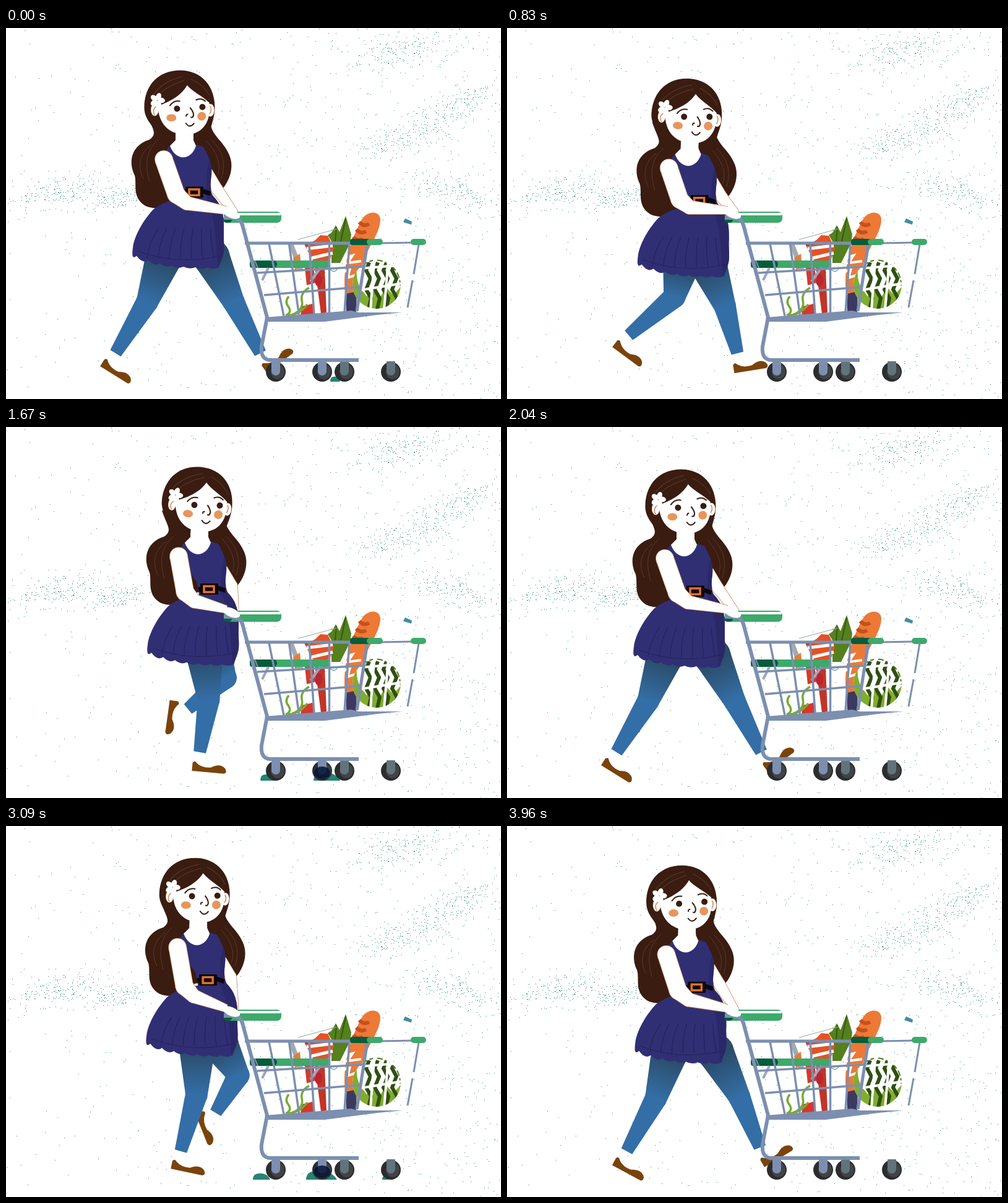
Recreate the animation shown at these times as an HTML page with a canvas. Size 800 by 600 pixels, loop 4000 ms.

```html
<!DOCTYPE html>
<html>
<head>
<meta charset="utf-8">
<style>
html, body { margin: 0; width: 100%; height: 100%; overflow: hidden; background: #fff; }
canvas { display: block; }
</style>
</head>
<body>
<canvas id="stage" width="800" height="600"></canvas>
<script>
const ctx = document.getElementById('stage').getContext('2d');
const { PI, sin, cos, abs, min, max, hypot } = Math;
const STEEL = '#7c8fb0', GREEN = '#3da96b', DEEP = '#075c3b', TEAL = '#258474';
const HAIR = '#3a1c11', SHEEN = '#5b3a2b', SKIN = '#fff', EDGE = '#c98a5a';
const NAVY = '#302f74', BLACK = '#0c080a', SHOE = '#7a430c';
const HALF = 16; // frames per step, two steps per walk cycle

function fill(d, color) {
  ctx.fillStyle = color;
  ctx.fill(new Path2D(d));
}
function line(d, color, width = 1.5) {
  ctx.strokeStyle = color;
  ctx.lineWidth = width;
  ctx.stroke(new Path2D(d));
}
function oval(x, y, rx, ry, color, turn = 0) {
  ctx.fillStyle = color;
  ctx.beginPath();
  ctx.ellipse(x, y, rx, ry, turn, 0, 7);
  ctx.fill();
}
function bar(x, y, w, h, r, color) {
  ctx.fillStyle = color;
  ctx.beginPath();
  ctx.roundRect(x, y, w, h, r);
  ctx.fill();
}
function placed(x, y, deg, draw) {
  ctx.save();
  ctx.translate(x, y);
  ctx.rotate(deg * PI / 180);
  draw();
  ctx.restore();
}
function repeat(n, part) {
  return Array.from({ length: n }, (_, i) => part(i)).join('');
}
// Tapered segments through points [x, y, radius]; the last end stays flat
function limb(points, color) {
  for (let i = 0; i < points.length - 1; i++) {
    const [x, y, r] = points[i], [X, Y, R] = points[i + 1];
    const len = hypot(X - x, Y - y), nx = (y - Y) / len, ny = (X - x) / len;
    oval(x, y, r, r, color);
    fill(`M${x + nx * r} ${y + ny * r}L${X + nx * R} ${Y + ny * R}L${X - nx * R} ${Y - ny * R}L${x - nx * r} ${y - ny * r}Z`, color);
  }
}
function skinLimb(points) {
  limb(points.map(([x, y, r]) => [x, y, r + .8]), EDGE);
  limb(points, SKIN);
}

// Fixed flecks of paint: an even dusting, denser to the right, plus a few clouds
let seed = 7;
const rnd = () => (seed = seed * 16807 % 2147483647) / 2147483647;
const bell = () => rnd() + rnd() + rnd() - 1.5;
const flecks = new Path2D();
const fleck = (x, y) => flecks.rect(Math.round(x), Math.round(y), 1, 1);
for (let i = 0; i < 900; i++) fleck(800 * rnd() ** .6, 600 * rnd());
function cloud(x, y, size, slope) {
  for (let i = 0; i < size * 2.2; i++) {
    const u = bell() * size;
    fleck(x + u, y + bell() * size / 3 + u * slope);
  }
}
cloud(640, 36, 90, -.15);
cloud(730, 125, 70, -.3);
cloud(640, 178, 85, -.25);
cloud(725, 265, 80, .35);
cloud(90, 265, 95, -.1);
cloud(180, 275, 50, -.15);

// Sway and bob of the upper body, one bounce per step
function bodyAt(f) {
  const lean = sin(PI * f / HALF);
  return {
    dx: 18 * abs(lean) + 6 * lean,
    dy: -1.5 - 3.5 * lean + (15 + 4 * lean) * sin(PI * f / 8),
    tilt: 3 + 3.5 * sin(PI * (f - 2) / 8)
  };
}

// p counts frames since the foot landed: first the foot carries, then it swings forward
function stride(p, dx) {
  const u = p % HALF / HALF, arc = sin(PI * u);
  return p < HALF
    ? { x: 411 - 234 * u + .8 * dx, y: 526, bend: 18 - 22 * u + 8 * arc,
        turn: min(0, 144 * u - 36) + max(0, 53 * (u - .4)) }
    : { x: 294 - 117 * cos(PI * u), y: 526 - 70 * arc ** 1.5, bend: 22 * u - 4 + 45 * arc,
        turn: 32 - 68 * u + 100 * arc ** 3 };
}

function leg(p, { dx, dy }) {
  const { x, y, bend, turn } = stride(p % (2 * HALF), dx);
  const kneeX = (288 + dx + x) / 2 + bend, kneeY = (360 + dy + y) / 2;
  const hipX = .45 * (288 + dx) + .55 * kneeX, hipY = 372 + dy;
  const blue = ctx.createLinearGradient(hipX, hipY, kneeX, kneeY);
  blue.addColorStop(.1, '#2b4c69');
  blue.addColorStop(1, '#346ea6');
  limb([[hipX, hipY, 30], [kneeX, kneeY, 18], [x, y, 10]], blue);
  placed(x, y, turn, () =>
    fill('M-10 31L-10 18Q-7 13-3 18Q6 25 20 23Q34 14 43 22Q48 29 42 31Z', SHOE));
}

function hairBack() {
  fill('M228 140C236 165 246 172 232 182C205 190 196 215 208 240C212 255 203 275 225 289C245 298 262 290 275 275L330 262L346 266C362 250 370 225 360 205C350 182 330 175 330 150Z', HAIR);
  line('M235 190C215 205 212 225 222 245M246 182C226 200 224 222 232 250M332 182C350 200 356 220 348 245M325 185C342 205 348 222 342 240', SHEEN, 1);
}

function head() {
  fill('M223 130C223 95 245 70 281 70C315 70 337 95 337 130C337 150 328 162 330 180L303 180L303 160L274 160L274 180L242 180C246 163 223 155 223 130Z', HAIR);
  line('M288 86C270 92 252 100 244 114M285 80C265 84 246 96 238 110M298 84C312 90 322 98 328 110', SHEEN, 1);
  for (const x of [240, 330]) {
    oval(x, 134, 6.5, 10.5, EDGE);
    oval(x, 134, 6, 10, SKIN);
  }
  fill('M292 94C300 104 318 112 328 122C332 152 318 174 290 174C262 174 246 155 245 128C262 122 282 112 292 94Z', SKIN);
  line('M242 129Q235 134 240 143M329 127Q333 132 329 140', EDGE);
  for (let a = 0; a < 6; a += PI * .4) oval(244 + 6.5 * cos(a), 119 + 6.5 * sin(a), 6, 4.3, SKIN, a);
  oval(267, 147, 8, 6, '#e8955c');
  oval(316, 144, 7, 7, '#e8955c');
  oval(276, 132, 5, 5, HAIR);
  oval(317, 129, 5, 5, HAIR);
  line('M264 128Q270 118 281 120M306 118Q315 113 322 120M297 130Q306 141 301 146L298 146M291 145Q290 141 294 141M290 155Q297 165 304 155', HAIR, 2);
}

function dress() {
  const hem = repeat(8, i => `Q${202 + 19 * i} ${378 + 15 * (1 - (1 - i / 7) ** 3)} ${211 + 19 * i} ${370 + 19 * (1 - (1 - i / 7) ** 3)}`);
  fill(`M255 205L264 192L307 190L319 194C325 205 335 222 332 240C330 254 329 262 334 272C347 286 353 300 352 330C351 350 355 360 349 375L344 389L205 357C207 338 222 312 238 295C258 280 272 279 288 276L284 255L262 225Z`, NAVY);
  fill(`M205 357${hem}L349 372L300 340Z`, NAVY);
  fill('M329 215C336 235 327 255 333 272C347 286 353 300 352 330C351 350 355 360 349 375L342 389C340 350 338 300 322 272C326 250 322 235 329 215Z', '#2b2868');
  line('M213 362Q275 386 347 370' + repeat(7, i => `M${246 + 14 * i} 326Q${230 + 17 * i} 350 ${228 + 18 * i} 374`), '#25225d', 1.2);
  fill('M274 160L274 183L265 192C274 217 299 217 307 192L303 183L303 160Z', SKIN);
  fill('M286 264L320 262L331 266L330 273L318 269L288 272Z', BLACK);
  bar(290, 258, 29, 18, 1, BLACK);
  ctx.strokeStyle = '#e2712b';
  ctx.lineWidth = 3.5;
  ctx.strokeRect(296, 262.5, 16, 9.5);
}

function loaf() {
  fill('M548 430C544 390 553 350 575 310C583 296 603 294 605 309C605 330 588 350 580 372L572 392L564 430Z', '#ed7937');
  line(repeat(3, i => `M${571 - 5 * i} ${314 + 12 * i}q7 8 16 3`), '#c6501d', 6);
  line('M546 372L560 368L552 380L574 377M545 395L556 389L552 404L570 398', SKIN, 4);
  fill('M549 430L567 426L566 459L550 462Z', '#3c3960');
}

function packets() {
  fill('M483 352L500 343L508 335L520 336L530 356L523 376L496 376Z', '#e45126');
  line('M486 357L528 352M494 372L528 364', SKIN, 5);
  line('M483 351L522 347', '#8b2033', 2);
  fill('M482 379L497 384L500 412L486 416Z', '#d43a27');
  fill('M499 386L515 390L518 460L509 462Z', '#c13528');
  oval(505, 408, 6, 10, '#ba2531');
  fill('M478 450L496 446L497 463L476 465Z', '#d8362c');
  fill('M456 348L464 348L480 390L472 392Z', '#a5a9ae');
  fill('M464 372L475 365L477 386L467 392Z', '#e27e3d');
}

function melon() {
  ctx.save();
  ctx.beginPath();
  ctx.ellipse(599, 415, 39, 39, 0, 0, 7);
  ctx.clip();
  fill('M558 370H640V458H558Z', SKIN);
  fill('M556 458V390L568 384Q564 405 573 421L583 434L592 424L604 437L614 419L626 432L640 416V460Z', '#80ad2d');
  line(repeat(4, i => `M${587 + 14 * i} 379l-5 13 7 13-7 18 8 14-4 18`), '#2f4f13', 6);
  ctx.restore();
  ctx.setLineDash([9, 4]);
  line('M576 384Q600 365 626 388Q638 400 637 420', '#4d7920', 2);
  ctx.setLineDash([]);
  line('M597 352L589 456M620 352L611 456M572 424L640 413M572 389L642 383', SKIN, 4);
}

function groceries() {
  fill('M520 335L526 331L533 319L539 330L549 304L558 334L556 348L540 380L526 380L526 345Z', '#55801f');
  line('M549 308L541 345M534 322L532 345', '#36590f', 2);
  line('M472 342L535 325', '#98a39a', 1);
  loaf();
  packets();
  line('M452 465Q463 460 456 450Q450 443 457 434M464 463Q482 455 478 440Q476 428 490 420M455 464Q472 466 487 447', '#78a935', 3.5);
  line('M524 391Q532 397 536 389', TEAL, 1);
  melon();
}

function wheel(x, steel) {
  oval(x, 556, 16, 16, '#2b2c2e');
  oval(x + 3, 556, 11, 12, '#414345');
  bar(x - 7, 539, 14, 23, [1, 1, 7, 7], steel);
}

// Low green mounds that drift by behind the wheels
function mounds(f) {
  const left = 524 - 1.2 * f - .27 * f * f;
  const dome = (x, w, h) => w > 0 &&
    fill(`M${x} 572Q${x} ${572 - h} ${x + w / 3} ${572 - h}Q${x + w * .8} ${570 - h} ${x + w} 572Z`, TEAL);
  dome(left, 16 + 3.4 * f, 8 + .6 * f);
  dome(left - 86, 3 * f - 2, 10);
  dome(left + 123, 3 * f - 20, 6);
}

function cart(f) {
  const passing = f < 15;
  if (passing) mounds(f);
  groceries();
  bar(352, 297, 93, 18, 7, GREEN);
  bar(362, 299, 82, 4, 1, SKIN);
  bar(351, 304, 14, 11, 5, DEEP);
  bar(394, 376, 128, 12, 3, GREEN);
  bar(394, 376, 44, 12, [5, 6, 6, 5], DEEP);
  line('M402 376L407 388', STEEL, 2);
  line('M414 408L424 388M492 410L508 388', '#9aa8c0', 4);
  line(repeat(5, i => `M${425 + 32.5 * i} 349L${449 + 24.5 * i} ${466 - 1.5 * i}`), STEEL, 3.5);
  line('M406 396L576 386M417 432L570 419', STEEL, 3.5);
  line('M584 349L567 458M386 348L582 348', STEEL, 5);
  line('M667 350L659 398M657 408L649 452M605 348L658 347', STEEL, 3);
  fill('M418 468L558 457L570 460L641 460L600 464L515 475L422 475Z', STEEL);
  line('M570 457L640 457', SKIN, 4);
  bar(556, 341, 36, 10, 4, DEEP);
  bar(583, 341, 26, 10, 5, GREEN);
  bar(654, 341, 25, 10, 5, GREEN);
  fill('M645 308L656 313L655 318L642 314Z', '#438ca5');
  for (const x of [547, 622]) wheel(x, '#60747b');
  for (const x of [436, 511]) wheel(x, STEEL);
  if (passing && f > 6) oval(511, 559, 13, 10, 'rgba(5,20,55,.85)');
  line('M352 307L368 307Q380 308 383 322L422 468L413 515Q411 537 428 537L570 537', STEEL, 6);
}

function draw(f) {
  ctx.fillStyle = '#fff';
  ctx.fillRect(0, 0, 800, 600);
  ctx.fillStyle = '#2f887b';
  ctx.fill(flecks);
  const body = bodyAt(f), { dx, dy, tilt } = body;
  leg(f + HALF, body);
  leg(f, body);
  placed(dx, dy, 0, hairBack);
  skinLimb([[330 + dx, 234 + dy, 4], [341 + dx, 262 + dy, 9], [370, 300, 6]]);
  placed(dx, dy, 0, dress);
  placed(288 + dx, 178 + dy, tilt, () => {
    ctx.translate(-288, -178);
    head();
  });
  cart(f);
  skinLimb([[255 + dx, 214 + dy, 14], [275 + dx * .6, 270 + dy * .6, 14], [292 + dx * .5, 284 + dy * .5, 11], [356, 295, 6]]);
  oval(364, 300, 15, 7, SKIN, .4);
}

function tick() {
  draw(Math.floor(performance.now() % 4000 * .024 + 1e-6) % (2 * HALF));
  requestAnimationFrame(tick);
}
tick();
</script>
</body>
</html>
```
